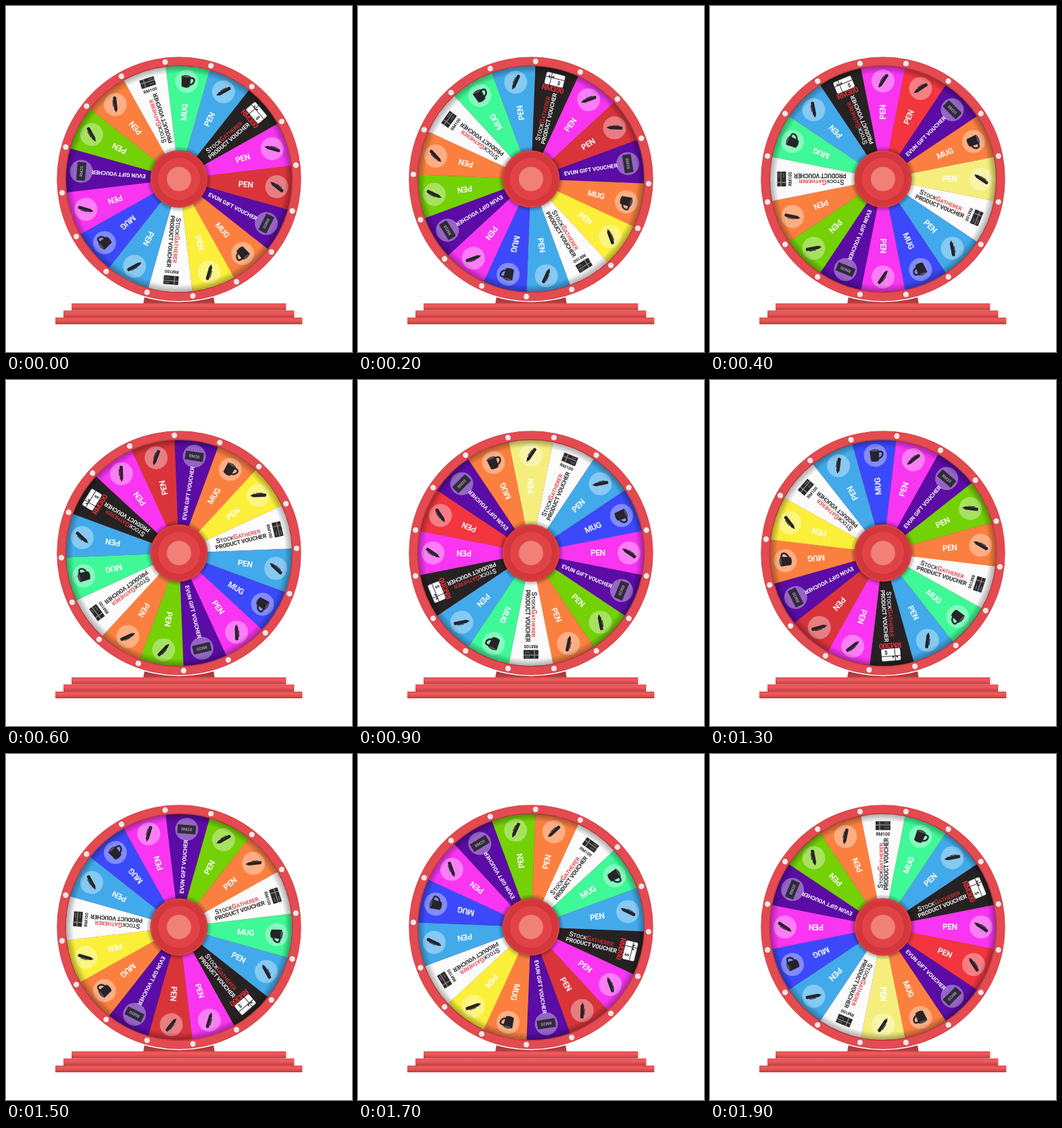
An HTML page that plays this animation: 512 px wide and 512 px high, repeating every 2000 ms.

```html
<!DOCTYPE html>
<html lang="en">
<head>
<meta charset="utf-8">
<title>Prize wheel</title>
<style>
  html, body { margin: 0; width: 100%; height: 100%; overflow: hidden; background: #fff; }
  svg { display: block; width: 100vw; height: 100vh; }
  text { font-family: Roboto, "Liberation Sans", sans-serif; font-weight: 700; text-anchor: middle; }
</style>
</head>
<body>
<svg viewBox="0 0 512 512">
  <defs>
    <linearGradient id="bar" x2="0" y2="1">
      <stop offset="0" stop-color="#e25254"/>
      <stop offset=".35" stop-color="#f15a5b"/>
      <stop offset="1" stop-color="#bd4143"/>
    </linearGradient>
    <linearGradient id="foot" x2="0" y2="1">
      <stop offset="0" stop-color="#8f2f31"/>
      <stop offset="1" stop-color="#c04143"/>
    </linearGradient>
    <radialGradient id="shade" gradientUnits="userSpaceOnUse" cx="0" cy="0" r="168">
      <stop offset=".25" stop-color="#000" stop-opacity=".3"/>
      <stop offset=".29" stop-color="#000" stop-opacity="0"/>
      <stop offset=".93" stop-color="#000" stop-opacity="0"/>
      <stop offset="1" stop-color="#000" stop-opacity=".34"/>
    </radialGradient>
    <g id="pen" transform="rotate(-56)" fill="#262329">
      <path d="M-12 0L-7-2.4H10Q12-2.4 12 0T10 2.4H-7Z"/>
      <path d="M-3-3.2H7" stroke="#262329"/>
    </g>
    <g id="mug">
      <path d="M5-5q7-1 6 4t-7 6" fill="none" stroke="#262329" stroke-width="2.4"/>
      <path d="M-8-7Q-1-11 6-7L5 8Q-1 11-7 8Z" fill="#262329"/>
      <ellipse cx="-1" cy="-7" rx="5.5" ry="1.4" fill="#55505a"/>
    </g>
    <g id="card">
      <rect x="-13.5" y="-6.5" width="27" height="13" rx="1" fill="#302b38"/>
      <text y="2.2" font-size="6" fill="#a59cae">RM20</text>
    </g>
    <g id="voucher">
      <rect x="-11" y="-6.5" width="22" height="13" fill="#2b2930"/>
      <path d="M-11-1H11M-5-6.5V6.5" stroke="#8d8a72" stroke-width="1.4"/>
      <path d="M2 3H9M2-4H9" stroke="#66626e" stroke-width="1.5"/>
    </g>
    <g id="giftcard">
      <rect x="-14" y="-9" width="28" height="18" rx="2" fill="#fff"/>
      <path d="M-14-2H14M-6-9V9" stroke="#333" stroke-width="1"/>
      <path d="M-6-2l-4-4v4zm0 0l4-4v4z" fill="#333"/>
      <text x="7" y="6.5" font-size="8" fill="#222">$</text>
    </g>
  </defs>

  <path d="M206 425H306L309 441H203Z" fill="url(#foot)"/>
  <g fill="url(#bar)">
    <rect x="97" y="440" width="317.5" height="10.5"/>
    <rect x="85" y="450.5" width="341.5" height="10.5"/>
    <rect x="73" y="461" width="365.5" height="10"/>
  </g>

  <g transform="translate(256 256)">
    <circle r="182.3" fill="#fff"/>
    <circle r="180.8" fill="#d9464b"/>
    <circle r="179.5" fill="#e34b50"/>
    <circle r="168.5" fill="#b9383d"/>
    <g id="wheel"></g>
    <circle r="42.5" fill="#d4373b"/>
    <circle r="41" fill="none" stroke="#df474a"/>
    <circle r="32.5" fill="#c93438"/>
    <circle r="31.5" fill="#e14246"/>
    <circle r="18" fill="#f08078"/>
  </g>
</svg>
<script>
const SLICE = 22.5, START = 4.5, STEP = 18, STEP_MS = 100, STEPS = 20;
const RIM = 167;
const COLORS = {
  mint: '#3ff897', sky: '#42aaea', black: '#262223', pink: '#f935f2',
  red: '#da343b', purple: '#5a0ca4', orange: '#fb803f', yellow: '#fbef3a',
  white: '#fbfbfb', blue: '#3b49fa', lime: '#74d106'
};
// Some steps show these two colours in a brighter tone.
const BRIGHT = { red: '#f2353e', yellow: '#f5ee7c' };

const slices = [
  'mint mug', 'sky pen', 'black giftcard', 'pink pen',
  'red pen', 'purple card', 'orange mug', 'yellow pen',
  'white voucher', 'sky pen', 'blue mug', 'pink pen',
  'purple card', 'lime pen', 'orange pen', 'white voucher'
].map(entry => entry.split(' '));

const text = (x, y, size, fill, content, extra = '') =>
  `<text x="${x}" y="${y}" font-size="${size}" fill="${fill}" ${extra}>${content}</text>`;
// Labels read outward from the hub.
const outward = content => `<g transform="rotate(-90)">${content}</g>`;
const badge = kind =>
  `<g transform="translate(0 -145)"><circle r="17" fill="#fff" fill-opacity=".36"/><use href="#${kind}"/></g>`;

function brandLabel(dark) {
  const ink = dark ? '#f0eeee' : '#2a2728';
  const small = letters => `<tspan font-size="7.9">${letters}</tspan>`;
  const name = `S${small('TOCK')}<tspan fill="#e0333a">G${small('ATHERER')}</tspan>`;
  return outward(
    text(91, -.5, 10, ink, name, 'style="font-weight:500"') +
    text(93, 8, 8.6, ink, 'PRODUCT VOUCHER', 'letter-spacing="-.2"'));
}

function sliceContent(kind) {
  if (kind === 'giftcard')
    return brandLabel(true) + text(0, -133.5, 11, '#e8323a', 'RM300', 'letter-spacing="-.6"') +
      '<use href="#giftcard" y="-151"/>';
  if (kind === 'voucher')
    return brandLabel(false) + text(0, -135.5, 6.4, '#2a2728', 'RM100') +
      '<use href="#voucher" y="-150"/>';
  const label = kind === 'card'
    ? text(89.5, 2.9, 8.2, '#fff', 'EVUN GIFT VOUCHER')
    : text(99, 4.3, 12, '#fff', kind.toUpperCase(), 'letter-spacing="-.4" fill-opacity=".92"');
  return outward(label) + badge(kind);
}

const half = SLICE / 2 * Math.PI / 180;
const dx = RIM * Math.sin(half), dy = -RIM * Math.cos(half);
const wedge = `M0 0L${-dx} ${dy}A${RIM} ${RIM} 0 0 1 ${dx} ${dy}Z`;
const turned = (i, content) => `<g transform="rotate(${START + i * SLICE})">${content}</g>`;

const wheel = document.getElementById('wheel');
wheel.innerHTML =
  slices.map(([color], i) =>
    turned(i, `<path class="${color}" d="${wedge}" fill="${COLORS[color]}"/>`)).join('') +
  slices.map(([, kind], i) => turned(i, sliceContent(kind))).join('') +
  '<circle r="167" fill="url(#shade)"/>' +
  slices.map((_, i) => turned(i + .5,
    '<circle cy="-174.2" r="4.8" fill="#c9454a"/><circle cy="-174.2" r="4.2" fill="#f0e6e6"/>')).join('');

const toned = Object.keys(BRIGHT).map(color => [color, wheel.querySelector('.' + color)]);

function draw(now) {
  const step = Math.floor(now / STEP_MS) % STEPS;
  wheel.setAttribute('transform', `rotate(${-step * STEP})`);
  const tones = step % 5 === 4 ? BRIGHT : COLORS;
  for (const [color, path] of toned) path.setAttribute('fill', tones[color]);
}

const start = performance.now();
function tick() {
  draw(performance.now() - start);
  requestAnimationFrame(tick);
}
tick();
</script>
</body>
</html>
```
